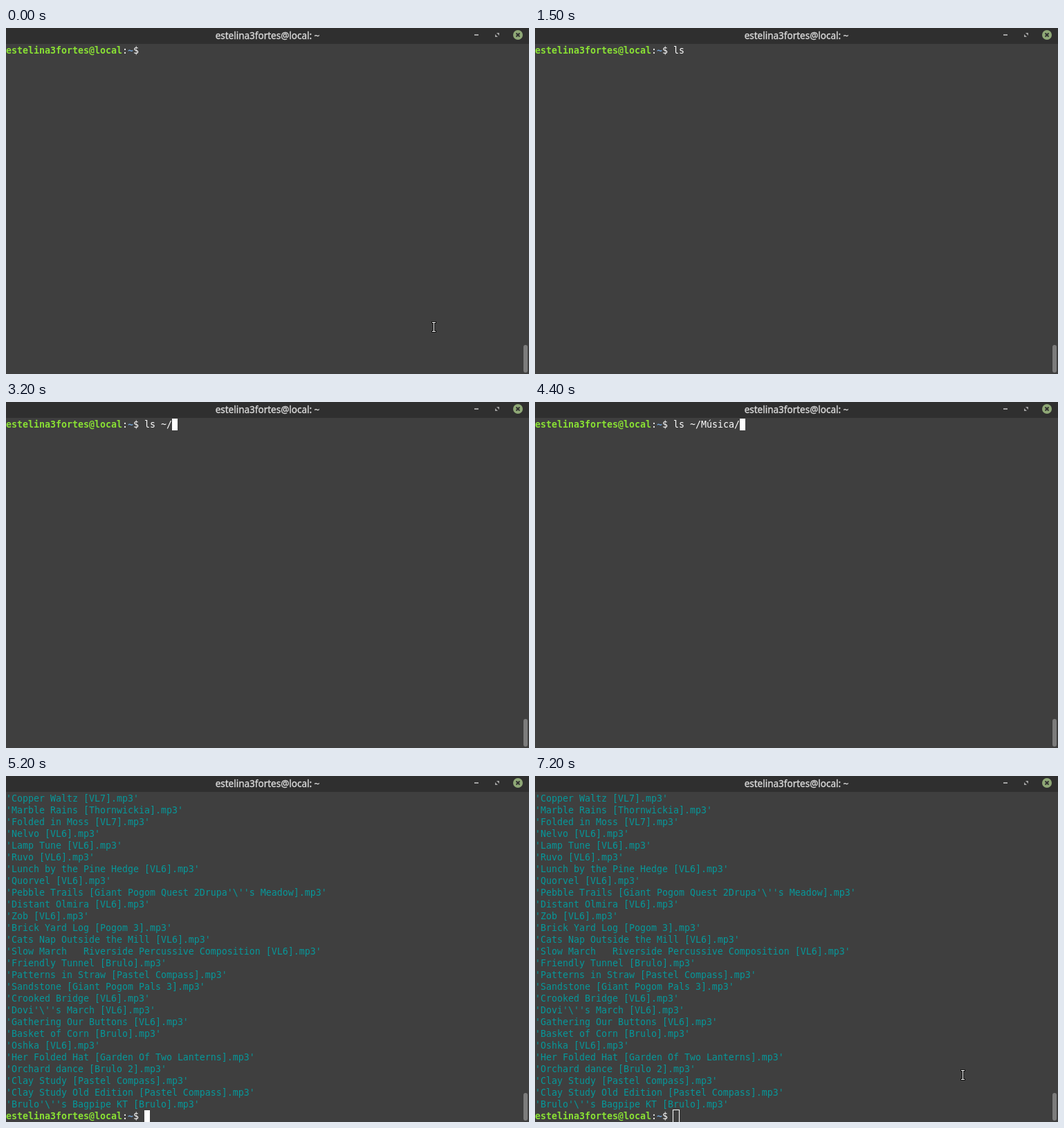
An HTML page for the animation above (7300 ms loop, 756x500 px).

```html
<!DOCTYPE html>
<html lang="pt">
<head>
<meta charset="utf-8">
<title>Terminal</title>
<style>
  html, body { margin: 0; width: 100%; height: 100%; overflow: hidden; background: #3f3f3f; }
  svg { display: block; width: 756px; height: 500px; }
  text { white-space: pre; }
  .mono { font: 13.29px "DejaVu Sans Mono", monospace; fill: #fff; }
  .title { font: 13.5px "Noto Sans", sans-serif; fill: #dadada; stroke: #dadada; stroke-width: .35; text-anchor: middle; }
  .user { font-weight: bold; fill: #8ae234; }
  .path { font-weight: bold; fill: #729fcf; }
  .file { fill: #06989a; }
</style>
</head>
<body>
<svg viewBox="0 0 756 500">
  <rect width="756" height="500" fill="#3f3f3f"/>
  <rect width="756" height="23" fill="#2f2f2f"/>
  <text class="title" id="title" x="378" y="16"></text>
  <rect x="677" y="9" width="6" height="2" fill="#a2a2a2"/>
  <path d="M709 7h4v4zM707 9v4h4z" fill="#a2a2a2"/>
  <circle cx="740" cy="10" r="7" fill="#8fa876"/>
  <path d="M737.5 7.5l5 5m0-5l-5 5" stroke="#2f2f2f" stroke-width="1.8"/>
  <rect x="748" y="458" width="6" height="40" rx="3" fill="#7c7c7c"/>
  <g id="files"></g>
  <rect id="cursor" width="8" height="17" fill="#fff"/>
  <text class="mono" id="prompt"><tspan class="user" id="user"></tspan>:<tspan class="path">~</tspan>$ <tspan id="typed"></tspan></text>
  <rect id="outline" x="199.5" y="482.5" width="9" height="18" fill="none" stroke="#fff"/>
  <g id="pointer" fill="none">
    <path d="M616.5 425.5h4M618.5 425.5v13M616.5 438.5h4" stroke="#111" stroke-width="3" stroke-linecap="square"/>
    <path d="M616 425.5h5M618.5 425.5v13M616 438.5h5" stroke="#fff"/>
  </g>
</svg>
<script>
const LOOP = 7300, CELL = 8, ROW = 17, TOP = 24, ASCENT = 13, PROMPT_COLS = 25;
const LISTED = 5200, UNFOCUSED = 7200, POINTER_HIDDEN = 400;
const USER = 'estelina3fortes@local';

const SONGS = String.raw`Copper Waltz [VL7]
Marble Rains [Thornwickia]
Folded in Moss [VL7]
Nelvo [VL6]
Lamp Tune [VL6]
Ruvo [VL6]
Lunch by the Pine Hedge [VL6]
Quorvel [VL6]
Pebble Trails [Giant Pogom Quest 2Drupa'\''s Meadow]
Distant Olmira [VL6]
Zob [VL6]
Brick Yard Log [Pogom 3]
Cats Nap Outside the Mill [VL6]
Slow March   Riverside Percussive Composition [VL6]
Friendly Tunnel [Brulo]
Patterns in Straw [Pastel Compass]
Sandstone [Giant Pogom Pals 3]
Crooked Bridge [VL6]
Dovi'\''s March [VL6]
Gathering Our Buttons [VL6]
Basket of Corn [Brulo]
Oshka [VL6]
Her Folded Hat [Garden Of Two Lanterns]
Orchard dance [Brulo 2]
Clay Study [Pastel Compass]
Clay Study Old Edition [Pastel Compass]
Brulo'\''s Bagpipe KT [Brulo]`.split('\n');

// [time, value]: each value holds until the next time
const TYPING = [[0, ''], [600, 'l'], [700, 'ls'], [1000, 'ls '], [2000, 'ls ~'],
  [3200, 'ls ~/'], [3800, 'ls ~/M'], [4400, 'ls ~/Música/'], [LISTED, '']];
const BLINK = [[0, false], [500, true], [1500, false], [1600, true], [2600, false],
  [3100, true], [4900, false], [5100, true], [5700, false], [6300, true], [UNFOCUSED, false]];

const $ = id => document.getElementById(id);
const show = (id, on) => $(id).setAttribute('visibility', on ? 'visible' : 'hidden');
const valueAt = (steps, t) => steps.findLast(([start]) => start <= t)[1];
const rowTop = row => TOP + row * ROW;

$('title').textContent = USER + ': ~';
$('user').textContent = USER;
SONGS.forEach((song, row) => {
  const line = document.createElementNS('http://www.w3.org/2000/svg', 'text');
  line.setAttribute('class', 'mono file');
  line.setAttribute('y', rowTop(row) + ASCENT);
  line.textContent = `'${song}.mp3'`;
  $('files').append(line);
});

function draw(t) {
  const listed = t >= LISTED;
  const typed = valueAt(TYPING, t);
  const top = rowTop(listed ? SONGS.length : 0);
  show('files', listed);
  $('prompt').setAttribute('y', top + ASCENT);
  $('typed').textContent = typed;
  $('cursor').setAttribute('x', (PROMPT_COLS + typed.length) * CELL);
  $('cursor').setAttribute('y', top);
  show('cursor', valueAt(BLINK, t));
  show('outline', t >= UNFOCUSED);
  show('pointer', t < POINTER_HIDDEN || t >= UNFOCUSED);
}

const begin = performance.now();
function tick() {
  draw((performance.now() - begin) % LOOP);
  requestAnimationFrame(tick);
}
tick();
</script>
</body>
</html>
```
